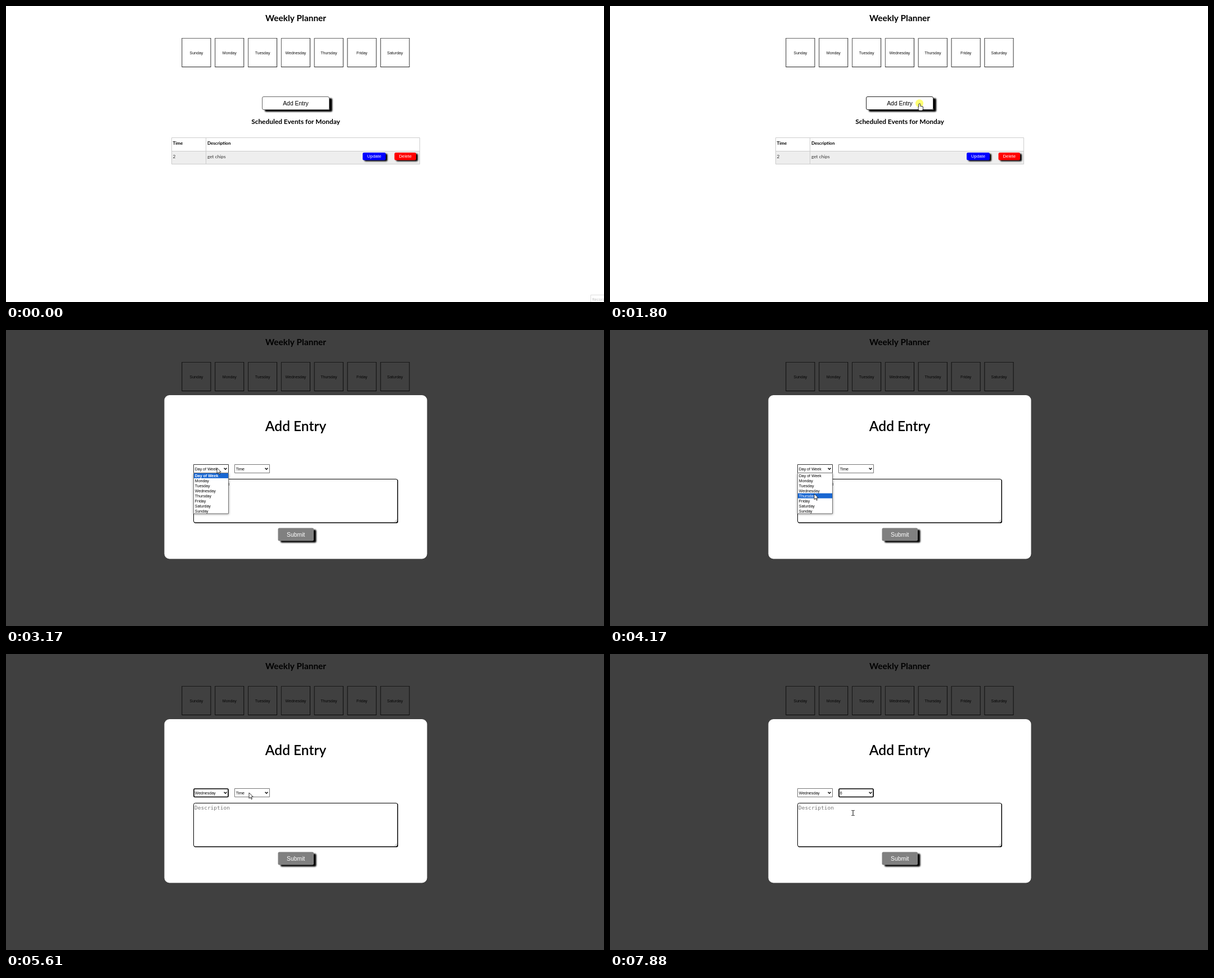
An HTML page with a canvas for the animation above (8000 ms loop, 1063x527 px).

```html
<!DOCTYPE html>
<html lang="en">
<head>
<meta charset="utf-8">
<title>Weekly Planner</title>
<style>
  html, body { margin: 0; width: 100%; height: 100%; overflow: hidden; background: #fff; }
  canvas { display: block; width: 1063px; height: 527px; }
</style>
</head>
<body>
<canvas id="stage"></canvas>
<script>
const W = 1063, H = 527, LOOP = 8000;
const canvas = document.getElementById('stage');
const dpr = window.devicePixelRatio || 1;
canvas.width = W * dpr;
canvas.height = H * dpr;
const c = canvas.getContext('2d');

const ROUND = 'Lato, sans-serif';
const ARIAL = '"Liberation Sans", Arial, sans-serif';
const MONO = '"DejaVu Sans Mono", monospace';

const WEEK = ['Monday', 'Tuesday', 'Wednesday', 'Thursday', 'Friday', 'Saturday'];
const DAYS = ['Sunday', ...WEEK];
const DAY_OPTIONS = ['Day of Week', ...WEEK, 'Sunday'];
const TIME_OPTIONS = ['Time', ...Array.from({ length: 12 }, (_, i) => String(i + 1))];

const LIST_TOP = 255, ROW = 8.93;
const rowY = i => LIST_TOP + i * ROW;

// When each click takes effect, in ms
const MODAL = 1860, DAY_OPEN = 3040, DAY_PICK = 4980, TIME_OPEN = 5740, TIME_PICK = 7240;
const CLICKS = [MODAL, DAY_OPEN, DAY_PICK, TIME_OPEN, TIME_PICK];
const PRESS = 90;

const HOME = { x: 1040, y: 520 };
const MOVES = [
  { from: 450, to: 1460, x: 550, y: 174 },
  { from: 2130, to: 2900, x: 375, y: 245.5 },
  { from: 3630, to: 4170, x: 363, y: rowY(4.1) },
  { from: 4380, to: 4450, x: 363, y: rowY(3.65) },
  { from: 5120, to: 5610, x: 432, y: 247 },
  { from: 6150, to: 6420, x: 431, y: rowY(5.8) },
  { from: 6680, to: 6750, x: 431, y: rowY(6.3) },
  { from: 7310, to: 7880, x: 432, y: 283 }
];

const within = (t, a, b) => t >= a && t < b;
const easeOut = p => 1 - (1 - p) ** 2.3;

function pointerAt(t) {
  let { x, y } = HOME;
  for (const m of MOVES) {
    if (t < m.from) break;
    const p = easeOut(Math.min(1, (t - m.from) / (m.to - m.from)));
    x += (m.x - x) * p;
    y += (m.y - y) * p;
  }
  return { x, y };
}

function text(str, x, y, font, color = '#000', align = 'left') {
  c.font = font;
  c.fillStyle = color;
  c.textAlign = align;
  c.fillText(str, x, y);
}

function rect(x, y, w, h, color) {
  c.fillStyle = color;
  c.fillRect(x, y, w, h);
}

function box(x, y, w, h, r, fill, stroke, line = 1) {
  c.beginPath();
  c.roundRect(x, y, w, h, r);
  if (fill) { c.fillStyle = fill; c.fill(); }
  if (stroke) { c.strokeStyle = stroke; c.lineWidth = line; c.stroke(); }
}

function line(color, width, ...points) {
  c.beginPath();
  points.forEach(([x, y]) => c.lineTo(x, y));
  c.strokeStyle = color;
  c.lineWidth = width;
  c.stroke();
}

function shadow(color, blur, dx, dy, draw) {
  c.save();
  c.shadowColor = color;
  c.shadowBlur = blur * dpr;
  c.shadowOffsetX = dx * dpr;
  c.shadowOffsetY = dy * dpr;
  draw();
  c.restore();
}

function button(label, x, y, w, h, size, fill, color, depth, border) {
  shadow('#000', 2.5, depth, depth * 0.65, () => box(x, y, w, h, 2.5, fill));
  if (border) box(x + 0.5, y + 0.5, w - 1, h - 1, 2.5, fill, border);
  text(label, x + w / 2, y + h / 2 + size * 0.35, `${size}px ${ARIAL}`, color, 'center');
}

function drawDay(name, i) {
  const x = 312.4 + i * 58.85, y = 57, size = 52;
  rect(x, y, size, size, '#222');
  rect(x, y, size - 1, size - 1, '#666');
  rect(x + 1, y + 1, size - 2, size - 2, '#fff');
  text(name, x + size / 2, y + 28.5, `7px ${ARIAL}`, '#111', 'center');
}

function drawPage(t) {
  rect(0, 0, W, H, '#fff');
  text('Weekly Planner', 515, 27.3, `700 15.4px ${ROUND}`, '#000', 'center');
  DAYS.forEach(drawDay);

  const border = within(t, 1300, MODAL) ? '#222' : '#666';
  button('Add Entry', 455, 161, 120, 24, 10.4, '#fff', '#000', 5, border);
  text('Scheduled Events for Monday', 515, 210, `700 11.9px ${ROUND}`, '#000', 'center');

  rect(295, 258, 440, 24, '#eee');
  box(294.5, 234.5, 441, 47, 0, null, '#ccc');
  rect(294, 258, 441, 1, '#ccc');
  rect(355, 234, 1, 48, '#ccc');
  [['Time', '2', 296.5], ['Description', 'get chips', 358]].forEach(([head, cell, x]) => {
    text(head, x, 247, `700 8px ${ROUND}`);
    text(cell, x, 270.5, `8.3px ${ROUND}`, '#333');
  });
  button('Update', 634, 261, 41, 13.5, 7.8, '#00f', '#fff', 3);
  button('Delete', 690.5, 261, 38.5, 13.5, 7.8, '#f00', '#fff', 3);

  if (t < 70) {
    box(1039.5, 514.5, 40, 20, 0, '#fff', '#ddd');
    text('Record', 1042, 525, '7px "Open Sans", sans-serif', '#bbb');
  }
}

function drawSelect(x, value, focused, active) {
  if (focused) box(x + 1, 240, 61, 14.5, 1.5, '#fff', '#000', 1.7);
  else box(x + 0.5, 239.5, 62, 15, 0, '#fff', active ? '#333' : '#767676');
  text(value, x + 2.7, 249.5, `7px ${ARIAL}`);
  line('#000', 1.4, [x + 54.6, 245.8], [x + 57, 248.3], [x + 59.4, 245.8]);
}

function drawList(x, options, pointerY) {
  const h = options.length * ROW + 1;
  const hot = Math.max(0, Math.floor((pointerY - LIST_TOP) / ROW));
  shadow('rgba(0,0,0,.4)', 4, 0, 1, () => rect(x, LIST_TOP - 0.5, 63, h, '#fff'));
  box(x + 0.5, LIST_TOP - 0.5, 62, h, 0, '#fff', '#767676');
  options.forEach((name, i) => {
    const lit = i === hot;
    if (lit) rect(x + 1, rowY(i), 61, ROW, '#1967d2');
    const weight = lit && i === 0 ? 'bold ' : '';
    text(name, x + 2.8, rowY(i) + 7, `${weight}7px ${ARIAL}`, lit ? '#fff' : '#000');
  });
}

function drawModal(t, pointerY) {
  rect(0, 0, W, H, 'rgba(0,0,0,.75)');
  box(281.5, 116, 467, 291.5, 9, '#fff');
  text('Add Entry', 515, 179.6, `600 24.5px ${ROUND}`, '#000', 'center');

  const dayOpen = within(t, DAY_OPEN, DAY_PICK);
  const timeOpen = within(t, TIME_OPEN, TIME_PICK);
  drawSelect(333, DAY_OPTIONS[t < DAY_PICK ? 0 : 3], within(t, DAY_PICK, TIME_OPEN), dayOpen);
  drawSelect(406, TIME_OPTIONS[t < TIME_PICK ? 0 : 6], t >= TIME_PICK, timeOpen);

  box(334, 266, 363, 78, 3, '#000');
  box(333.5, 265.5, 362.5, 77.5, 3, '#fff', '#000');
  text('Description', 335, 277, `9.5px ${MONO}`, '#757575');
  for (const d of [2, 4.5]) line('#888', 0.7, [695 - d, 342], [695, 342 - d]);

  button('Submit', 483.5, 352.5, 63.5, 23, 10.4, '#808080', '#fff', 4.5);

  if (dayOpen) drawList(333, DAY_OPTIONS, pointerY);
  if (timeOpen) drawList(406, TIME_OPTIONS, pointerY);
}

const shapes = {
  arrow() {
    c.beginPath();
    [[0, 0], [0, 10.2], [2.4, 8], [4.1, 11.7], [5.6, 11], [4, 7.4], [7.2, 7.2]]
      .forEach(([x, y]) => c.lineTo(x, y));
    c.closePath();
    c.fillStyle = '#fff';
    c.fill();
    c.strokeStyle = '#000';
    c.lineWidth = 0.8;
    c.stroke();
  },
  hand() {
    const finger = [-0.8, 0.3, 2.2, 8, 1], palm = [-1.6, 4.8, 7.6, 7, 2];
    for (const part of [finger, palm]) box(...part, null, '#000', 1.6);
    for (const part of [finger, palm]) box(...part, '#fff');
  },
  // Inverts what lies below it
  beam() {
    c.globalCompositeOperation = 'difference';
    rect(-0.5, -4.5, 1, 9, '#fff');
    for (const y of [-5, 4]) {
      rect(-2.5, y, 2, 1, '#fff');
      rect(0.5, y, 2, 1, '#fff');
    }
  }
};

function pointerShape(t, x, y) {
  if (t < MODAL) return y < 186 && x < 575 ? 'hand' : 'arrow';
  const listOpen = within(t, DAY_OPEN, DAY_PICK) || within(t, TIME_OPEN, TIME_PICK);
  const onTitle = y < 186 && x > 460;
  const onArea = !listOpen && y > 265;
  return onTitle || onArea ? 'beam' : 'arrow';
}

function drawPointer(t, { x, y }) {
  if (t < MOVES[0].from) return;
  if (CLICKS.some(at => within(t, at - PRESS, at))) {
    c.beginPath();
    c.arc(x, y - 0.7, 7, 0, Math.PI * 2);
    c.fillStyle = 'rgba(255,255,0,.55)';
    c.fill();
  }
  c.save();
  c.translate(x, y);
  shapes[pointerShape(t, x, y)]();
  c.restore();
}

function frame(now) {
  const t = now % LOOP;
  const pointer = pointerAt(t);
  c.setTransform(dpr, 0, 0, dpr, 0, 0);
  drawPage(t);
  if (t >= MODAL) drawModal(t, pointer.y);
  drawPointer(t, pointer);
}

const begin = performance.now();
function tick() {
  frame(performance.now() - begin);
  requestAnimationFrame(tick);
}
tick();
</script>
</body>
</html>
```
